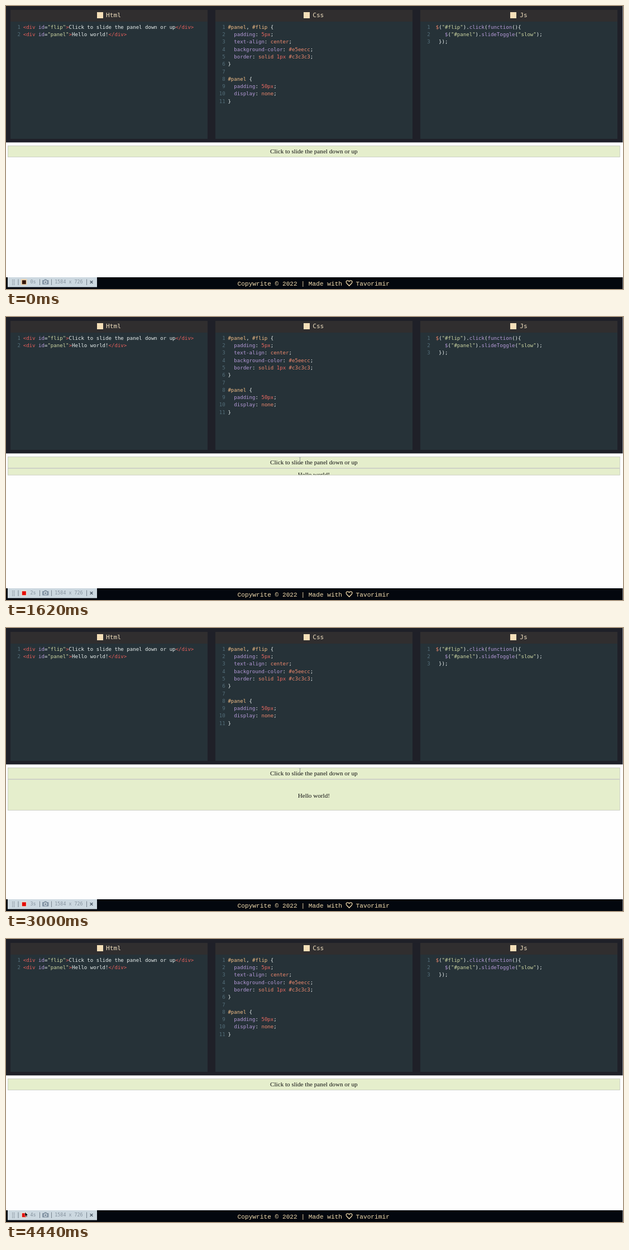
These frames come from a looping animation (1105 px wide and 507 px high, 4500 ms). An HTML page:

```html
<!DOCTYPE html>
<html lang="en">
<head>
<meta charset="utf-8">
<title>Slide toggle demo</title>
<style>
html, body { margin: 0; width: 100%; height: 100%; overflow: hidden; background: #fefefe; }
.stage { position: absolute; left: 0; top: 0; width: 1105px; height: 507px; overflow: hidden; }
.pane { position: absolute; top: 7px; width: 353px; height: 231px; background: #263238; }
.pane h2 {
  margin: 0; height: 20.5px; background: #302e2f; color: #f1e0c0;
  font: 11.16px/20px "DejaVu Sans Mono", monospace;
}
.pane h2 span, .pane h2 i { position: absolute; }
.pane h2 i { top: 3.5px; width: 11px; height: 11px; background: #f5dfb8; }
pre {
  position: absolute; top: 24.8px; margin: 0; color: #e9efee;
  font: 9.07px/13.3px "DejaVu Sans Mono", monospace;
}
.num { color: #546e7a; text-align: right; width: 14px; }
pre b { font-weight: normal; }
.t { color: #e8605c; }
.p { color: #b59ad8; }
.s { color: #cdd6a2; }
.q { color: #f2bd86; }
.n { color: #ec6a62; }
.a { color: #ee896e; }
.view {
  position: absolute; left: 3px; top: 250.1px; width: 1572px;
  transform: scale(.6976); transform-origin: 0 0;
  font: 16px/18px "Liberation Serif", "Times New Roman", serif; color: #111; text-align: center;
}
.view div { border: 1px solid #c3c3c3; background: #e5eecc; }
#flip { padding: 5px; }
#panel { overflow: hidden; }
svg { position: absolute; left: 0; top: 0; }
.foot { font: 11.16px "Liberation Mono", "Courier New", monospace; fill: #f3dcae; }
.tool { font: 8.37px "DejaVu Sans Mono", monospace; fill: #85929e; }
</style>
</head>
<body>
<div class="stage">
  <svg width="1105" height="507"><rect width="1104.5" height="244.4" fill="#1f2028"/></svg>

  <section class="pane" style="left:8px">
    <h2><i style="left:154.5px"></i><span style="left:171px">Html</span></h2>
    <pre class="num" style="left:4px">1
2</pre>
    <pre style="left:22.7px"><b class="t">&lt;div</b> <b class="p">id</b>=<b class="s">"flip"</b><b class="t">&gt;</b>Click to slide the panel down or up<b class="t">&lt;/div&gt;</b>
<b class="t">&lt;div</b> <b class="p">id</b>=<b class="s">"panel"</b><b class="t">&gt;</b>Hello world!<b class="t">&lt;/div&gt;</b></pre>
  </section>
  <section class="pane" style="left:374.7px">
    <h2><i style="left:158px"></i><span style="left:174.5px">Css</span></h2>
    <pre class="num" style="left:4px">1
2
3
4
5
6
7
8
9
10
11</pre>
    <pre style="left:22.7px"><b class="q">#panel</b>, <b class="q">#flip</b> {
  <b class="p">padding</b>: <b class="n">5px</b>;
  <b class="p">text-align</b>: <b class="a">center</b>;
  <b class="p">background-color</b>: <b class="a">#e5eecc</b>;
  <b class="p">border</b>: <b class="a">solid</b> <b class="n">1px</b> <b class="a">#c3c3c3</b>;
}

<b class="q">#panel</b> {
  <b class="p">padding</b>: <b class="n">50px</b>;
  <b class="p">display</b>: <b class="a">none</b>;
}</pre>
  </section>
  <section class="pane" style="left:741.5px">
    <h2><i style="left:161px"></i><span style="left:178.8px">Js</span></h2>
    <pre class="num" style="left:4.3px">1
2
3</pre>
    <pre style="left:22.7px"> <b class="a">$</b>(<b class="s">"#flip"</b>).<b class="p">click</b>(<b class="p">function</b>(){
    <b class="p">$</b>(<b class="s">"#panel"</b>).<b class="p">slideToggle</b>(<b class="s">"slow"</b>);
  });</pre>
  </section>

  <div class="view">
    <div id="flip">Click to slide the panel down or up</div>
    <div id="panel">Hello world!</div>
  </div>

  <svg width="1105" height="507" viewBox="0 0 1105 507">
    <rect y="486" width="1104.5" height="21" fill="#03070e"/>
    <g class="foot">
      <text x="414.6" y="501">Copywrite © 2022 | Made with</text>
      <path d="M614.6 501.3L610.3 497C607.9 494.5 609.5 491.9 611.8 491.9C613.2 491.9 614.1 492.8 614.6 493.5C615.1 492.8 616 491.9 617.4 491.9C619.7 491.9 621.3 494.5 618.9 497Z" fill="none" stroke="#f3dcae" stroke-width="1.3"/>
      <text x="626.6" y="501">Tavorimir</text>
    </g>
    <rect x="3" y="486" width="160" height="17.6" fill="#ccd8e0"/>
    <path d="M11.8 490v10M14.6 490v10" stroke="#7c8893" stroke-width="1.2" stroke-dasharray="1.2 1"/>
    <path d="M22 489.5v10.5M60.5 489.5v10.5M81.5 489.5v10.5M144.5 489.5v10.5" stroke="#77838e"/>
    <rect id="halo" x="26.6" y="489" width="11" height="11" rx="1"/>
    <rect id="dot" x="28.8" y="491.3" width="7" height="7"/>
    <g class="tool">
      <text id="sec" x="43.5" y="497"></text>
      <text x="87.3" y="497">1584 x 726</text>
    </g>
    <path d="M66 491h2.2l1-1.6h3l1 1.6h2.2q1 0 1 1v5.8q0 1-1 1H66q-1 0-1-1V492q0-1 1-1Z" fill="#8293a3"/>
    <circle cx="70.7" cy="494.8" r="2.4" fill="#8293a3" stroke="#dbe4ea" stroke-width="1.1"/>
    <path d="M150.6 492.2l4.8 4.8M155.4 492.2l-4.8 4.8" stroke="#4c5967" stroke-width="1.3"/>
    <path id="beam" d="M-1.6 -5Q0 -5 0 -4V4Q0 5 -1.6 5M1.6 -5Q0 -5 0 -4V4Q0 5 1.6 5" fill="none" stroke="#8d9190" stroke-width=".7"/>
    <path id="arrow" d="M0 0V8.2L1.8 6.6L3 9.3L4.3 8.7L3.1 6.1H5.5Z" fill="#050505" stroke="#fff" stroke-width=".5"/>
  </svg>
</div>
<script>
const LOOP = 4500, TICK = 60, SLOW = 600;
const OPEN = 1474, CLOSE = 2763, LEAVE = 3420;
const DARK = [[0, 60], [540, 660], [1560, 1620], [2520, 2820], [3540, 3600]];
const $ = id => document.getElementById(id);
const clamp = v => Math.min(1, Math.max(0, v));
const swing = p => .5 - Math.cos(Math.PI * clamp(p)) / 2;
const mix = (a, b, k) => a + (b - a) * k;
const show = (el, on) => { el.style.display = on ? "" : "none"; };

function slide(t) {
  const k = swing((t - OPEN) / SLOW) - swing((t - CLOSE) / SLOW);
  const s = $("panel").style;
  show($("panel"), k > .001);
  s.height = 18 * k + "px";
  s.paddingTop = s.paddingBottom = 50 * k + "px";
}

function recorder(t) {
  const dark = DARK.some(([a, b]) => t >= a && t < b);
  $("dot").setAttribute("fill", dark ? "#351708" : "#e60d06");
  $("halo").setAttribute("fill", dark ? "#ecd5b4" : "#dedfda");
  $("sec").textContent = Math.floor((t + 480) / 1000) + "s";
}

function pointer(t) {
  const leaving = t >= LEAVE;
  let x = 526.5, y = t < 1320 ? 249 : 256.5;
  if (leaving) {
    const a = clamp((t - LEAVE + TICK) / 420);
    const b = clamp((t - 3780) / 600);
    const out = 1 - (1 - b) ** 2;
    x = mix(mix(x, 266, a), 34, out);
    y = mix(mix(y, 472.5, a), 489, out);
  }
  show($("beam"), t >= 1200 && !leaving);
  show($("arrow"), leaving);
  $(leaving ? "arrow" : "beam").setAttribute("transform", `translate(${x} ${y})`);
}

function draw() {
  const t = Math.floor(performance.now() % LOOP / TICK) * TICK;
  slide(t);
  recorder(t);
  pointer(t);
  requestAnimationFrame(draw);
}
draw();
</script>
</body>
</html>
```
